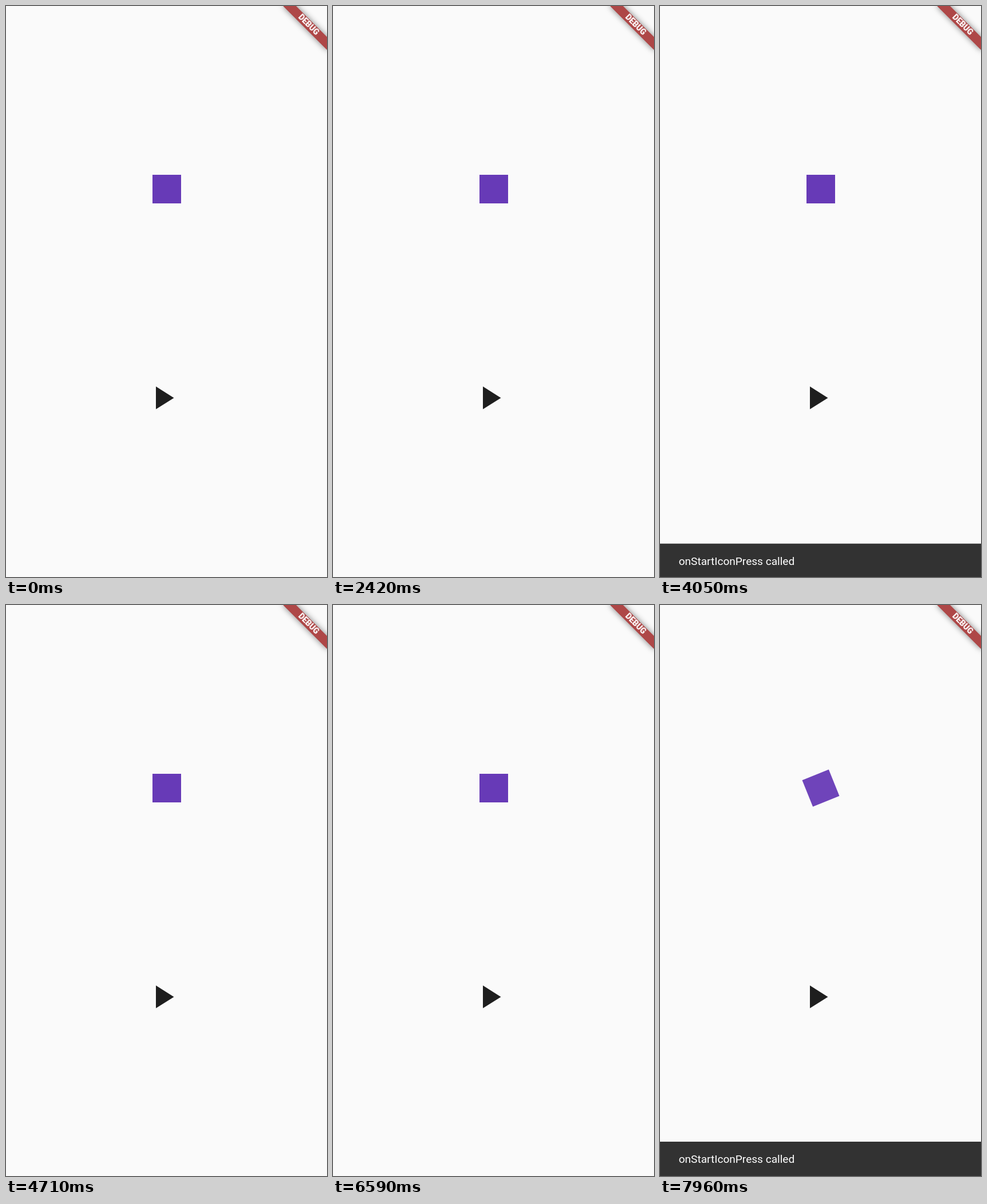
Recreate the animation shown at these times as an HTML page. Size 561 by 998 pixels, loop 8 s.

```html
<!DOCTYPE html>
<html lang="en">
<head>
<meta charset="utf-8">
<title>Animated icon demo</title>
<style>
  html, body {
    margin: 0;
    width: 100%;
    height: 100%;
    overflow: hidden;
    background: #fafafa;
  }
  .stage {
    --loop: 8000ms linear infinite both;
    --standard: cubic-bezier(.4, 0, .2, 1);
    --reversed: cubic-bezier(.8, 0, .6, 1);
    --fade-out: cubic-bezier(.333, .667, .667, 1);
    --fade-in: cubic-bezier(.333, 0, .667, .333);
    position: relative;
    width: 561px;
    height: 998px;
    overflow: hidden;
    font-family: Roboto, sans-serif;
    color: #fff;
  }
  .stage > * { position: absolute; }

  .banner {
    left: 473.6px;
    top: 24.6px;
    width: 109px;
    height: 16.4px;
    transform: rotate(45deg);
    background: #ae4747;
    box-shadow: 0 0 11px rgba(0, 0, 0, .5);
    font-size: 13.9px;
    font-weight: 900;
    line-height: 15px;
    text-align: center;
  }

  .ripple {
    left: 208px;
    top: 247.5px;
    width: 145px;
    height: 145px;
    border-radius: 50%;
    background: #c8c8c8;
    animation: ripple var(--loop);
  }
  .icon {
    left: 255.5px;
    top: 295px;
    width: 50px;
    height: 50px;
    background: #673ab7;
    animation: turn var(--loop), blend var(--loop);
  }
  .play {
    left: 262px;
    top: 665px;
    width: 31.5px;
    height: 39.8px;
    background: #1e1e1e;
    clip-path: polygon(0 0, 100% 50%, 0 100%);
  }

  .snack {
    left: 0;
    bottom: 0;
    box-sizing: border-box;
    width: 100%;
    height: 60.4px;
    padding: 19px 32.7px;
    background: #323232;
    font-size: 19.09px;
    white-space: nowrap;
  }
  .snack span { animation: label var(--loop); }
  .on-start { animation: snack-start var(--loop); }
  .on-end { animation: snack-end var(--loop); }

  /* Presses fall at 34.875%, 63.45% and 92.925% of the loop. */
  @keyframes ripple {
    0%, 38%, 66.575% { transform: none; opacity: 0; animation-timing-function: step-end; }
    34.875%, 63.45%, 92.925% { transform: scale(0); opacity: .4; }
    36.125%, 64.7%, 94.175% { transform: none; opacity: .24; }
    96.05%, 100% { transform: none; opacity: 0; }
  }

  /* Half a turn forward, back, then forward again until the cut. */
  @keyframes turn {
    0%, 34.875% { transform: rotate(0deg); }
    42.375%, 63.45% { transform: rotate(180deg); }
    70.95%, 92.925% { transform: rotate(0deg); }
    100% { transform: rotate(169.8deg); }
  }

  /* Cross-fade of two stacked layers: opacity 1 - x(1 - x). */
  @keyframes blend {
    0% { opacity: 1; }
    34.875%, 63.45%, 92.925% { opacity: 1; animation-timing-function: var(--fade-out); }
    38.625%, 67.2%, 96.675% { opacity: .75; animation-timing-function: var(--fade-in); }
    42.375%, 70.95% { opacity: 1; }
    100% { opacity: .946; }
  }

  @keyframes snack-start {
    0% { transform: translateY(100%); }
    34.875%, 92.925% { transform: translateY(100%); animation-timing-function: var(--standard); }
    38% { transform: none; }
    50.5% { transform: none; animation-timing-function: var(--reversed); }
    53.625% { transform: translateY(100%); }
    96.05%, 100% { transform: none; }
  }

  @keyframes snack-end {
    0% { transform: translateY(100%); }
    63.45% { transform: translateY(100%); animation-timing-function: var(--standard); }
    66.575% { transform: none; }
    79.075% { transform: none; animation-timing-function: var(--reversed); }
    82.2%, 100% { transform: translateY(100%); }
  }

  /* The text appears late in each entry and leaves with its bar. */
  @keyframes label {
    0%, 60%, 90% { opacity: 0; }
    37.125%, 65.7%, 95.175% { opacity: 0; animation-timing-function: var(--standard); }
    38%, 66.575% { opacity: 1; }
    59.99%, 89.99% { opacity: 1; }
    96.05%, 100% { opacity: 1; }
  }
</style>
</head>
<body>
  <main class="stage">
    <div class="ripple"></div>
    <div class="icon"></div>
    <div class="play"></div>
    <div class="snack on-start"><span>onStartIconPress called</span></div>
    <div class="snack on-end"><span>onEndIconPress called</span></div>
    <div class="banner">DEBUG</div>
  </main>
</body>
</html>
```
